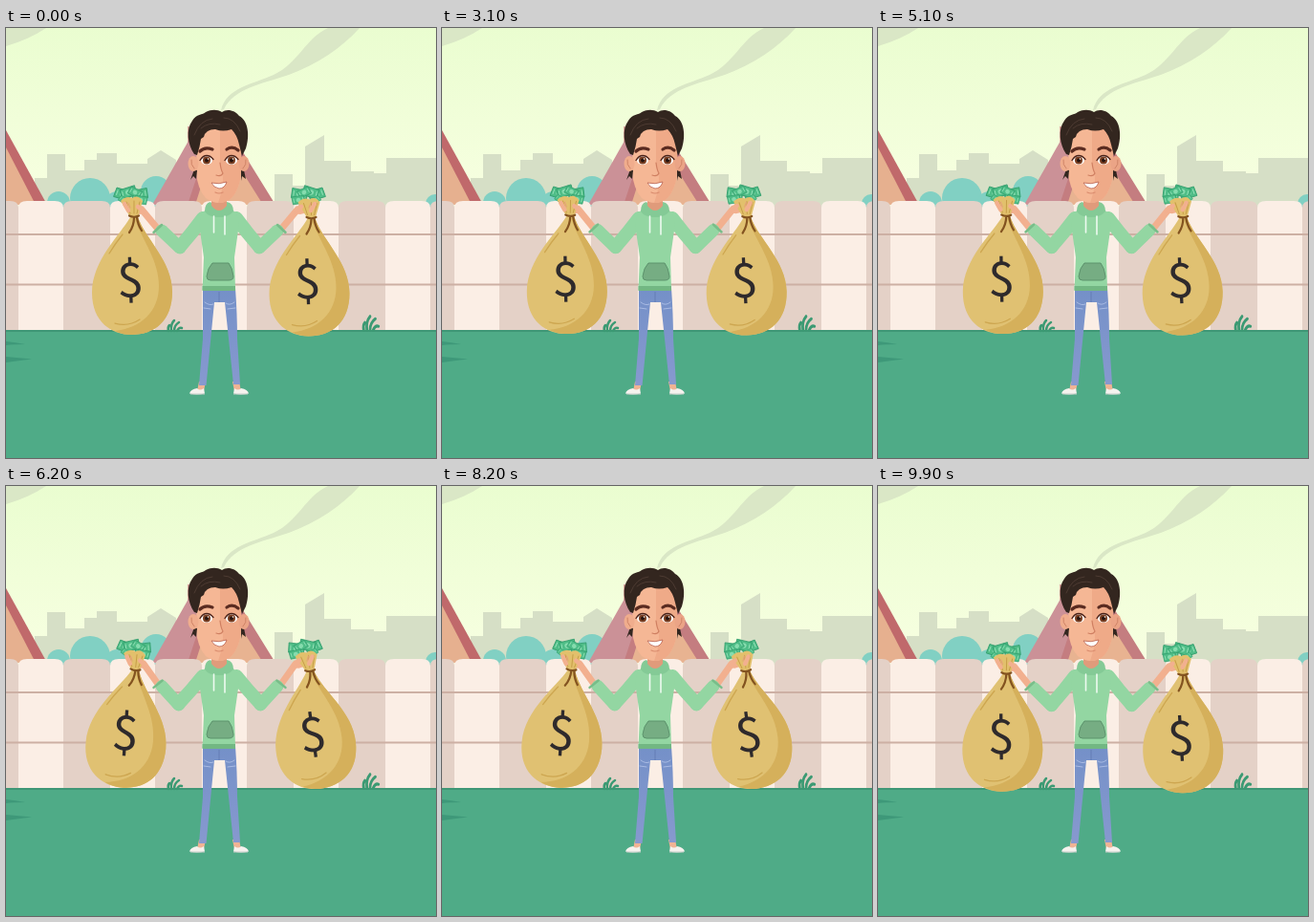
Recreate the animation shown at these times as an HTML page without scripts. Size 450x450 px, loop 10000 ms.

```html
<!DOCTYPE html>
<html lang="en">
<head>
<meta charset="utf-8">
<title>Money bags</title>
<style>
@property --lift { syntax: '<number>'; inherits: true; initial-value: 0; }
html, body { margin: 0; width: 100%; height: 100%; overflow: hidden; background: #4fab87; }
svg { display: block; width: 100vw; height: 100vh; animation: lift 1s step-end infinite; }
.arm { transform-origin: 207px 198px; transform: rotate(calc(var(--lift) * 6deg)); }
.fore { transform-origin: 181px 232px; transform: rotate(calc(var(--lift) * 5deg)); }
.sack { transform-origin: 134px 197px; transform: rotate(calc(var(--lift) * 3.5deg)); }
.sign { font: 500 50px "Noto Sans CJK JP", "Noto Sans CJK SC", "Noto Sans CJK", "Open Sans", sans-serif; text-anchor: middle; fill: #2e2a2c; }
.line { fill: none; stroke-linecap: round; stroke-linejoin: round; }
@keyframes lift {
  0%, 100% { --lift: 0; }
  10% { --lift: .07; }
  20% { --lift: .4; }
  30% { --lift: .7; }
  40% { --lift: .92; }
  50% { --lift: 1; }
  60% { --lift: .93; }
  70% { --lift: .68; }
  80% { --lift: .36; }
  90% { --lift: .1; }
}
</style>
</head>
<body>
<svg viewBox="0 0 450 450">
  <defs>
    <linearGradient id="sky" x2="0" y2=".6">
      <stop offset="0" stop-color="#eafdd0"/>
      <stop offset="1" stop-color="#f8ffe2"/>
    </linearGradient>
    <linearGradient id="jeans" x2="0" y2="1">
      <stop offset="0" stop-color="#7490c8"/>
      <stop offset="1" stop-color="#8799cf"/>
    </linearGradient>
    <pattern id="planks" x="13" y="181" width="96" height="136" patternUnits="userSpaceOnUse">
      <path d="M0 136V7Q0 0 9 0H38Q47 0 47 7V136Z" fill="#fbeee5"/>
      <path d="M47 136V7Q47 0 56 0H87Q96 0 96 7V136Z" fill="#e4d1c7"/>
    </pattern>
    <path id="tuft" d="M-6 7Q-7 3-5 1M-3 7Q-4 0 0-4M0 7Q0 1 5-2M3 7Q5 3 8 4" class="line" stroke="#3b9a73" stroke-width="2.500"/>
    <g id="note">
      <path d="M-8-4.500L8-5.500L8 4.500L-8 5.500Z" fill="#4fbd87" stroke="#2f9c6b" stroke-width=".8"/>
      <ellipse rx="3" ry="2.800" fill="#86dcae"/>
      <path d="M-6-2.500L-6 3M6-3L6 2.500" stroke="#92e0b6"/>
    </g>
    <g id="cash">
      <use href="#note" transform="translate(122 174) rotate(20)"/>
      <use href="#note" transform="translate(140 174) rotate(-8)"/>
      <use href="#note" transform="translate(128 172) rotate(-14)"/>
      <use href="#note" transform="translate(135 172) rotate(28) scale(.8)"/>
      <use href="#note" transform="translate(141 180) rotate(12) scale(.8)"/>
      <use href="#note" transform="translate(123 180) rotate(35) scale(.6)"/>
    </g>
    <g id="bag">
      <path d="M130 198L120 181Q126 175 132 178Q138 174 143 181L138 198Z" fill="#e2c06c"/>
      <path d="M130 194L126 182M134 194L134 181M137 194L140 182" class="line" stroke="#c79d48" stroke-width="1"/>
      <path d="M130 198C120 216 90 243 90 277C90 308 111 321 131 321C156 321 174 306 174 276C174 244 146 221 138 198Z" fill="#e0c172"/>
      <path d="M138 198C146 221 174 244 174 276C174 306 156 321 131 321Q122 321 114 317C141 314 160 297 160 270C160 243 143 223 135 200Z" fill="#d5b05b"/>
      <path d="M114 309Q128 313 140 305M122 216Q114 226 108 236" class="line" stroke="#cda650" stroke-width="1.300"/>
      <path d="M129 196.500Q134 199 139 196.500M134 198Q134 207 129 214M137 198Q138 206 142 212" class="line" stroke="#835320" stroke-width="2.200"/>
      <text class="sign" x="130" y="281.500" transform="rotate(-2 130 264)">$</text>
    </g>
    <path id="upper" d="M206 199Q195 214 182 229" class="line" stroke="#93d6a2" stroke-width="14"/>
    <g id="lower">
      <path d="M162 214L142 190" class="line" stroke="#f2b08f" stroke-width="7"/>
      <path d="M146 194L140 184L132 182L127 187L131 193L139 195Z" fill="#f2b08f"/>
      <path d="M182 230L163 212" class="line" stroke="#93d6a2" stroke-width="13"/>
      <path d="M154.500 214L163 206" class="line" stroke="#78bd89" stroke-width="2.500"/>
    </g>
    <g id="fingers" class="line" stroke="#f2b08f" stroke-width="4.500">
      <path d="M124 184L128 191M143 191L138 187"/>
      <path d="M128 183L130 188" stroke="#e59c7c" stroke-width="1"/>
    </g>
    <g id="eye">
      <ellipse rx="6" ry="4.500" fill="#fff"/>
      <circle r="4" fill="#7a3f22"/>
      <circle r="2" fill="#25130e"/>
      <circle cx="1.500" cy="-1.500" r=".8" fill="#fff"/>
      <path d="M-7 0Q-4-5 0-5Q4-5 7-1" class="line" stroke="#4a2219" stroke-width="1.300"/>
    </g>
    <g id="shoe">
      <path d="M202 370L209 370L207 380L200 380Z" fill="#f0b394"/>
      <path d="M192 382.500Q193 378 200 377Q203 380 207 377L208 382.500Q200 384.500 192 382.500Z" fill="#f5f2ee"/>
      <path d="M193 383H208" stroke="#c9cdc9"/>
    </g>
  </defs>

  <!-- sky and town -->
  <rect width="450" height="320" fill="url(#sky)"/>
  <g fill="#dae7c6">
    <path d="M225 86C231 62 258 59 280 49C306 37 313 11 337 0H370C352 20 326 38 296 49C266 59 239 63 228 85Z"/>
    <path d="M0 0H42Q24 12 0 19Z"/>
  </g>
  <path d="M30 190V157H43V132H62V149H82V138H95V131H116V142H148V137L162 128L178 138V190ZM281 190V153H300V165H313V124L333 112V139H361V150H385V152H398V136H450V190Z" fill="#d6dfc6"/>
  <g fill="#81d0c3">
    <circle cx="55" cy="183" r="12"/>
    <circle cx="88" cy="178" r="21"/>
    <circle cx="116" cy="183" r="12"/>
    <circle cx="157" cy="171" r="16"/>
    <circle cx="449" cy="184" r="10"/>
  </g>
  <path d="M0 115L32 185H0Z" fill="#e6b08f"/>
  <path d="M0 107L43 185H31L0 125Z" fill="#c0696b"/>
  <path d="M190 103H197V120H190Z" fill="#dba99f"/>
  <path d="M220 100L270 185H180Z" fill="#e8b391"/>
  <path d="M191 118L222 88L195 185H153Z" fill="#cb9197"/>
  <path d="M222 88L282 185H269L222 110L198 185H190Z" fill="#c47d80"/>

  <!-- fence and lawn -->
  <rect y="181" width="450" height="136" fill="url(#planks)"/>
  <path d="M0 216H450M0 268.500H450" stroke="#cdb0a4" stroke-width="2"/>
  <rect y="316" width="450" height="134" fill="#4fab87"/>
  <path d="M0 317H450" stroke="#3f9776" stroke-width="2"/>
  <path d="M0 328Q10 329 20 331Q8 331 0 332ZM0 344Q14 345 27 346.500Q12 348 0 350Z" fill="#3e9879"/>
  <use href="#tuft" x="176" y="310"/>
  <use href="#tuft" transform="translate(381 307) scale(1.100 1.300)"/>

  <!-- arms with bags -->
  <g class="arm">
    <use href="#upper"/>
    <g class="fore">
      <use href="#lower"/>
      <use href="#cash"/>
      <g class="sack"><use href="#bag"/></g>
      <use href="#fingers"/>
    </g>
  </g>
  <g transform="matrix(-1 0 0 1 447 0)">
    <g class="arm">
      <use href="#upper"/>
      <g class="fore">
        <use href="#lower"/>
        <use href="#cash"/>
        <g class="sack"><use href="#bag" transform="translate(261.500 1.500) scale(-1 1)"/></g>
        <use href="#fingers"/>
      </g>
    </g>
  </g>

  <!-- legs -->
  <use href="#shoe"/>
  <use href="#shoe" transform="matrix(-1 0 0 1 446 0)"/>
  <path d="M206 272H240Q242 300 242 325L245 373H238L229 287H218L209.500 374H202L206 325Z" fill="url(#jeans)"/>
  <path d="M208 287Q213 291 217 289M230 288Q234 291 239 287M207 293L214 294M232 294L240 293" class="line" stroke="#a9bbe4" stroke-width="1"/>
  <path d="M223 276V287" stroke="#647db5"/>

  <!-- hoodie -->
  <path d="M209 190Q223 184 237 190Q245 196 243 212L239 240L240 274H205.500L207 240L203 212Q201 196 209 190Z" fill="#93d6a2"/>
  <path d="M205.500 270H240V275H205.500Z" fill="#72b783"/>
  <path d="M208 192Q208 183 214 182Q222 194 231 182Q238 183 238 192Q233 198 223 198Q212 198 208 192Z" fill="#84ca96"/>
  <path d="M215 174H231V186Q223 196 215 186Z" fill="#e09b7b"/>
  <path d="M217.500 197V214M229 197V216" class="line" stroke="#eefaf0" stroke-width="1.600"/>
  <path d="M216 246H233Q237 251 238 260Q238 264 233 264H214Q210 264 210 260Q211 251 216 246Z" fill="#76ad83" stroke="#5c936c" stroke-width="1"/>

  <!-- head -->
  <path d="M200 98H246V150Q245 168 236 178Q223 188 209 178Q200 168 199 150Z" fill="#f5b795"/>
  <path d="M224 98H246V150Q245 168 236 178Q230 183 222 183Q231 158 224 145Z" fill="#efaa88"/>
  <path d="M197 132C190 122 188 106 195 97C199 90 206 91 209 88C215 85 221 85 226 88C231 84 240 86 244 92C254 97 255 114 251 126L247 134L244 122Q242 112 236 106Q227 109 219 106Q209 106 207 114L204 116Q203 124 200 133Z" fill="#33261f"/>
  <path d="M197 148L200 149L199 158L196 155L193 159ZM246 148L249 149L251 158L247 155L246 160Z" fill="#33261f"/>
  <ellipse cx="196" cy="142" rx="5.500" ry="8" fill="#f0ad8d"/>
  <ellipse cx="249" cy="142" rx="5.500" ry="8" fill="#eba486"/>
  <path d="M194 138Q193 143 197 147M251 138Q252 143 248 147" class="line" stroke="#cf8467" stroke-width="1"/>
  <path d="M197 112Q203 96 216 95M204 105Q212 98 224 101M228 94Q239 94 245 108" class="line" stroke="#4d3b32" stroke-width="1"/>
  <path d="M203 129Q208 124 216 127M231 127Q237 123 243 128" class="line" stroke="#5a2b20" stroke-width="3.200"/>
  <use href="#eye" x="210" y="138.500"/>
  <use href="#eye" x="236" y="138.500"/>
  <path d="M224 141Q225 149 227 152Q225 156 220 154" class="line" stroke="#cf7f61" stroke-width="1.200"/>
  <path d="M215 162Q223 164 231 161Q229 168 223 168Q217 167 215 162Z" fill="#fff" stroke="#b9604c" stroke-width=".8"/>
  <path d="M219 172Q223 174 227 172" class="line" stroke="#d98c6e" stroke-width="1.200"/>
</svg>
</body>
</html>
```
